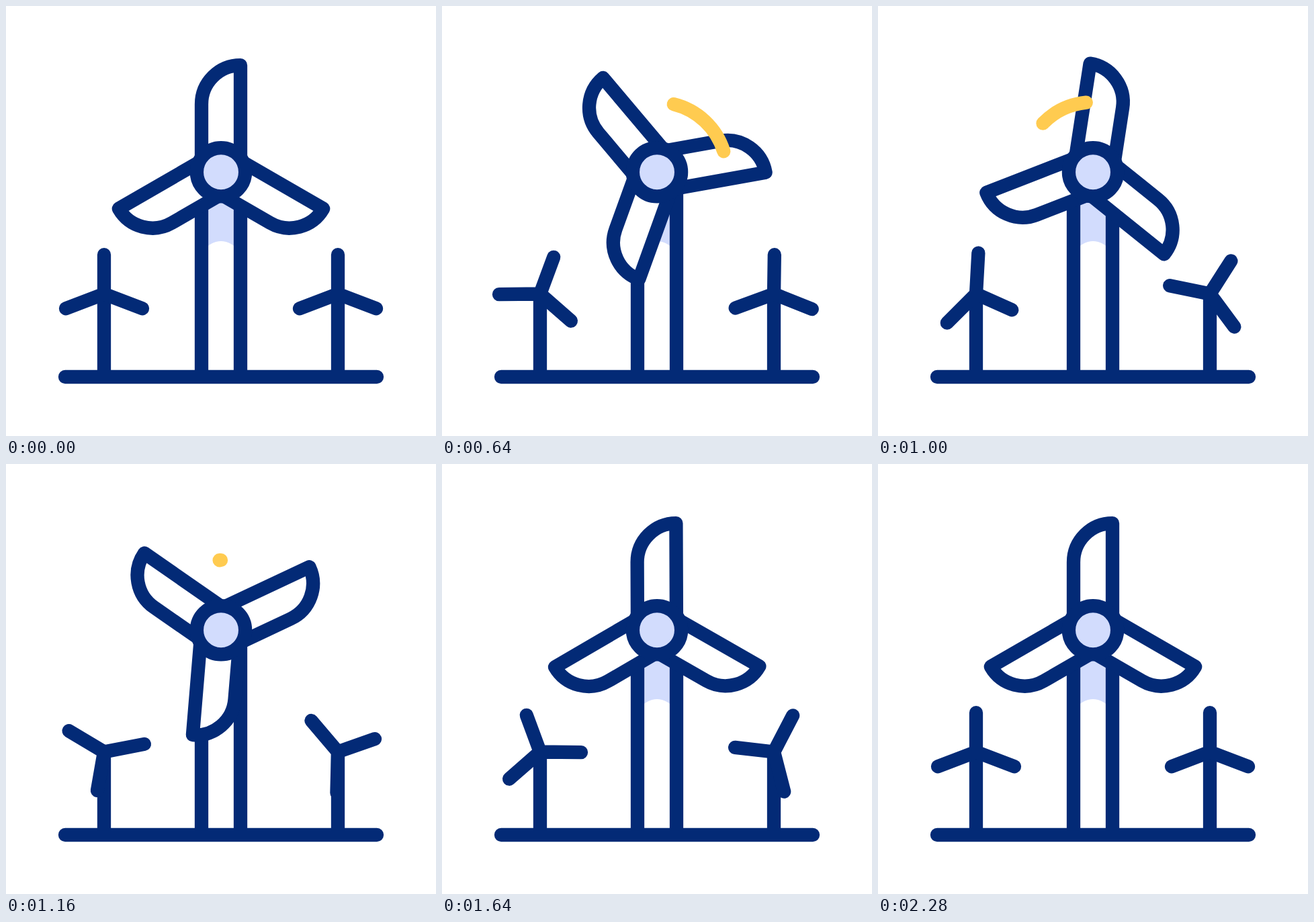
Write an HTML page that moves like this. It is 640 px wide and 640 px high and loops after 2.32 s.

```html
<!DOCTYPE html>
<html lang="en">
<head>
<meta charset="utf-8">
<title>Wind turbines</title>
<style>
  html, body { margin: 0; width: 100%; height: 100%; overflow: hidden; background: #fff; }
  svg { display: block; width: 100vw; height: 100vh; }
  .line { fill: none; stroke: #032a76; stroke-width: 20.3; stroke-linecap: round; stroke-linejoin: round; }
  .blade { fill: #fff; }
  .hub { fill: #d2dcfd; }
  .glow { fill: #d2dcfd; }
  #gust { stroke: #ffcb50; }
</style>
</head>
<body>
<svg viewBox="0 0 640 640">
  <defs>
    <path id="blade" class="line blade" d="M-29 -21.5V-101A58 58 0 0 1 29 -159V-21.5"/>
    <path id="fan" class="line" d="M0 -58.3V0M-57 21.8L0 0L57 21.8"/>
  </defs>

  <path class="glow" d="M291 262H349V366Q335 350 320 350Q305 350 291 366Z"/>
  <path class="line" d="M291 270V552H349V270M88 552H552M146 428.5V552M494 428.5V552"/>

  <g transform="translate(146 428.5)"><use id="left" href="#fan"/></g>
  <g transform="translate(494 428.5)"><use id="right" href="#fan"/></g>

  <g transform="translate(320 247.2)">
    <g id="rotor">
      <use href="#blade"/>
      <use href="#blade" transform="rotate(-120)"/>
      <use href="#blade" transform="scale(-1 1) rotate(-120)"/>
    </g>
    <circle class="line hub" r="36.1"/>
    <path id="gust" class="line"/>
  </g>
</svg>
<script>
const LOOP = 2320, STEP = 40, GUST_R = 104;
const byId = id => document.getElementById(id);

// Cubic easing (.58, 0, .42, 1), solved for x by bisection
const curve = (s, a, b) => 3 * s * (1 - s) ** 2 * a + 3 * s * s * (1 - s) * b + s ** 3;
function ease(x) {
  if (x <= 0) return 0;
  if (x >= 1) return 1;
  let lo = 0, hi = 1;
  for (let i = 0; i < 30; i++) {
    const mid = (lo + hi) / 2;
    if (curve(mid, .58, .42) < x) lo = mid; else hi = mid;
  }
  return curve(lo, 0, 1);
}

// Degrees of one full turn between two times
const turn = (t, from, to) => 360 * ease((t - from) / (to - from));

const spinners = [
  ['rotor', 40, 1680],
  ['left', 280, 2000],
  ['right', 560, 2280],
];

function rim(deg) {
  const a = deg * Math.PI / 180;
  return `${(GUST_R * Math.sin(a)).toFixed(2)} ${(-GUST_R * Math.cos(a)).toFixed(2)}`;
}

function drawGust(t) {
  const head = turn(t, 400, 1080), tail = turn(t, 520, 1200);
  const span = head - tail;
  byId('gust').setAttribute('d', span < .01 ? '' :
    `M${rim(tail)}A${GUST_R} ${GUST_R} 0 ${span > 180 ? 1 : 0} 1 ${rim(head)}`);
}

function draw(t) {
  for (const [id, from, to] of spinners)
    byId(id).setAttribute('transform', `rotate(${turn(t, from, to).toFixed(3)})`);
  drawGust(t);
}

const start = performance.now();
function tick() {
  const t = (performance.now() - start) % LOOP;
  draw(Math.floor(t / STEP) * STEP);
  requestAnimationFrame(tick);
}
tick();
</script>
</body>
</html>
```
